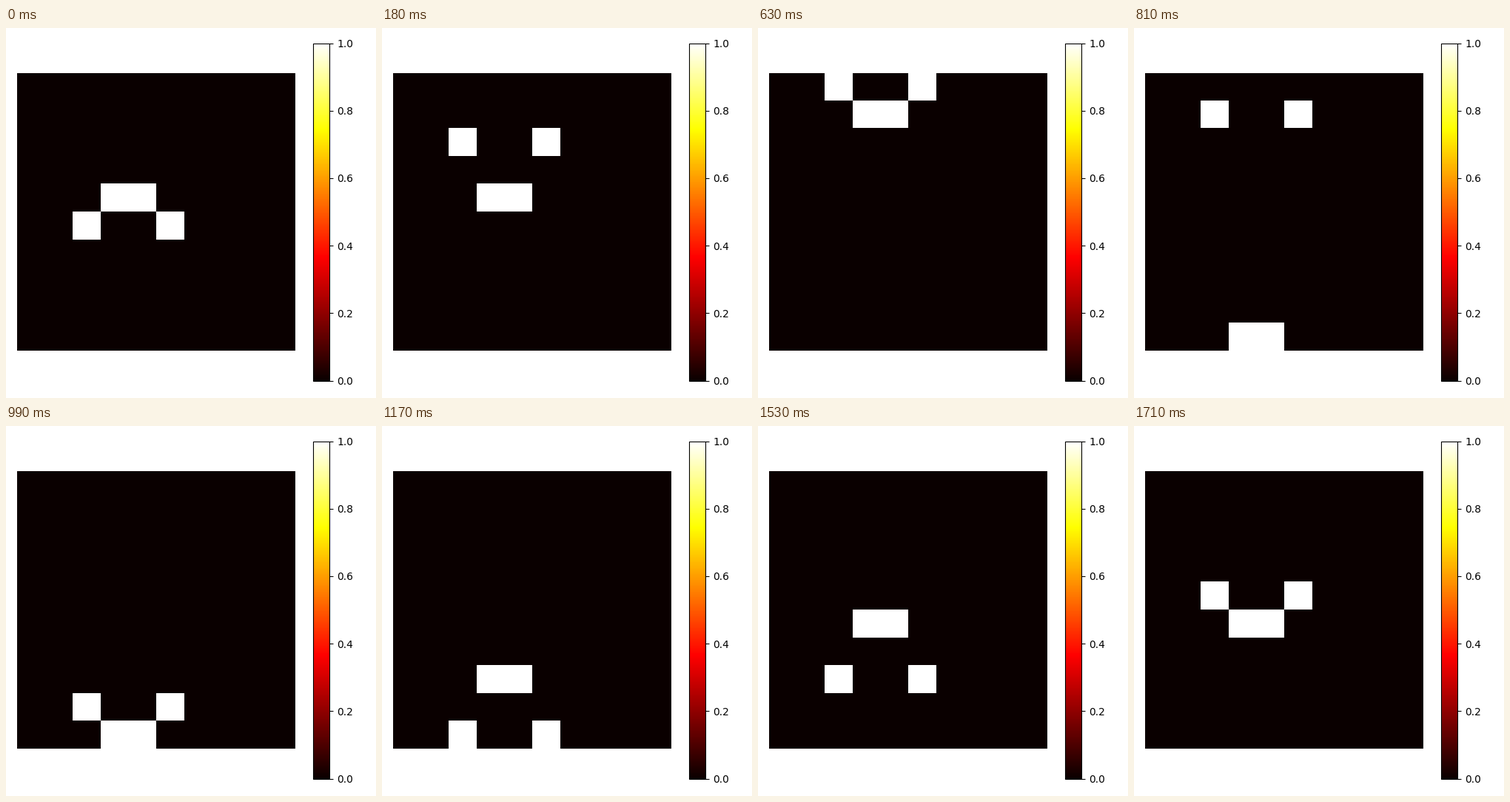
A matplotlib script for the animation above (1.8 s loop, 500 px wide and 500 px high).

```python
import matplotlib.pyplot as plt
import numpy as np
from matplotlib.animation import FuncAnimation

SIZE = 10
STEPS = 20
INNER, OUTER = [3, 4], [2, 5]
# Glider phases: row of the inner pair, row of the outer pair
PHASES = [(4, 5), (3, 5), (4, 2), (3, 2)]


def grid(step):
    """Four-phase glider, climbing two rows per cycle on a wrapped grid."""
    cycle, phase = divmod(step, len(PHASES))
    inner, outer = ((row - 2 * cycle) % SIZE for row in PHASES[phase])
    cells = np.zeros((SIZE, SIZE))
    cells[inner, INNER] = 1
    cells[outer, OUTER] = 1
    return cells


fig, ax = plt.subplots(figsize=(5, 5), dpi=100)
image = ax.imshow(grid(0), cmap="hot", vmin=0, vmax=1, interpolation="nearest")
ax.axis("off")
fig.colorbar(image, ax=ax)
fig.tight_layout()


def update(step):
    image.set_data(grid(step))
    return [image]


anim = FuncAnimation(fig, update, frames=STEPS, interval=90, repeat=True)
plt.show()
```
